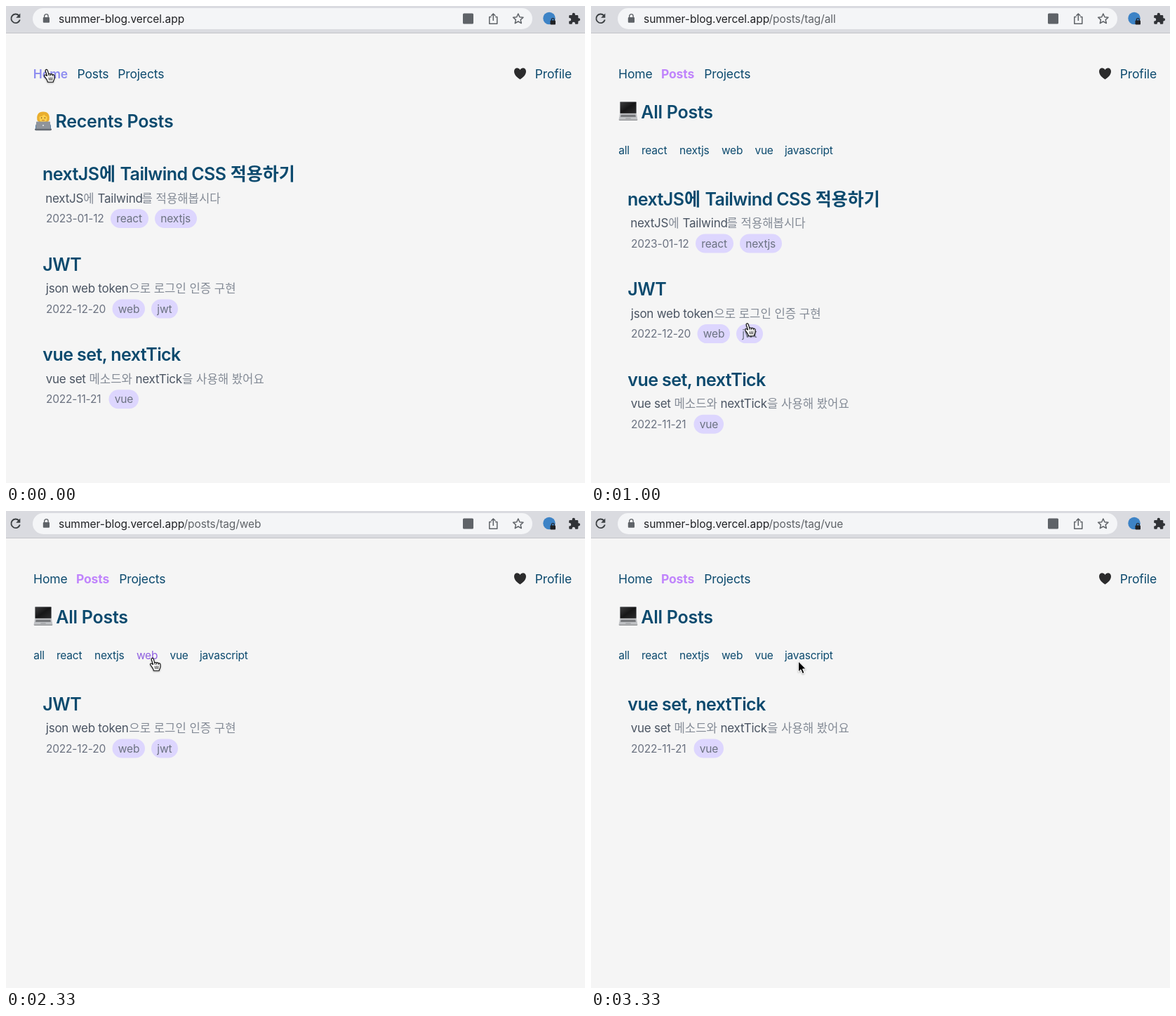
Animation, 825 px wide and 679 px high, one loop 3670 ms. Source, as an HTML page:

```html
<!DOCTYPE html>
<html lang="ko">
<head>
<meta charset="utf-8">
<title>Blog</title>
<style>
html, body { margin: 0; width: 100%; height: 100%; overflow: hidden; background: #f5f5f5; }
svg { display: block; }
text { font-family: Inter, "Noto Sans CJK KR", "Noto Sans CJK", sans-serif; font-optical-sizing: none; white-space: pre; }
.nav { font-size: 17.5px; letter-spacing: -.13px; fill: #0c4a6e; }
.head, .title { font-size: 25px; font-weight: 600; letter-spacing: -.27px; fill: #0c4a6e; }
.title { letter-spacing: -.57px; }
.desc { font-size: 17px; letter-spacing: -.25px; fill: #4b5563; }
.ko { font-family: "Noto Sans CJK KR", "Noto Sans CJK", sans-serif; letter-spacing: 0; }
.desc.ko { font-size: 16.7px; font-weight: 100; fill: #848b96; }
.small { font-size: 15.5px; letter-spacing: -.17px; fill: #6b7280; }
.tag { font-size: 15.5px; letter-spacing: -.22px; fill: #0c4a6e; }
.url { font-size: 15.5px; letter-spacing: 0; fill: #202124; }
.path { letter-spacing: -.1px; fill: #5f6368; }
</style>
</head>
<body>
<svg width="825" height="679" viewBox="0 0 825 679">
  <defs>
    <linearGradient id="screen" x1="0" y1="0" x2="1" y2="1">
      <stop offset="0" stop-color="#3c3c3e"/><stop offset=".5" stop-color="#161617"/><stop offset="1" stop-color="#2b2b2d"/>
    </linearGradient>
    <filter id="shade" x="-50%" y="-50%" width="200%" height="200%">
      <feDropShadow dx="0" dy="1" stdDeviation=".9" flood-opacity=".35"/>
    </filter>
    <g id="laptop">
      <rect x="41" y="136" width="24" height="17.5" rx="1.2" fill="#a3a5a8"/>
      <rect x="41.7" y="136.7" width="22.6" height="16" rx=".6" fill="url(#screen)"/>
      <path d="M41 153.5H65L66.3 161.5H39.7Z" fill="#bfc1c4"/>
      <path d="M42.7 154.7H63.3L63.9 158H42.1Z" fill="#77797c"/>
      <path d="M49.5 159H56.5L56.8 161H49.2Z" fill="#a8aaad"/>
      <path d="M39.7 161.5H66.3V162.3Q66 163 65 163H41Q40 163 39.7 162.3Z" fill="#8d8f92"/>
    </g>
    <g id="coder">
      <path d="M42 175V171Q42 167 47 166H59Q64 167 64 171V175Z" fill="#5a83a8"/>
      <path d="M44.5 163Q42.5 150.5 53 150.5Q63.5 150.5 61.5 163L59 165H47Z" fill="#e9ae2e"/>
      <path d="M47.5 157.5Q52 157 54.5 154.5Q56 157.500 58.5 157.500V160Q58 166 53 166Q48 166 47.5 160Z" fill="#ffcf4d"/>
      <circle cx="50.6" cy="159.3" r=".8" fill="#5a3b20"/>
      <circle cx="55.4" cy="159.3" r=".8" fill="#5a3b20"/>
      <path d="M51 162.4Q53 163.5 55 162.4" fill="none" stroke="#a8632a" stroke-width=".8"/>
      <rect x="43" y="164.5" width="20" height="11" rx="1" fill="#8f949b"/>
      <circle cx="53" cy="170" r="1.1" fill="#e4e6e9"/>
      <path d="M41 174.800H65V176Q64.5 177.3 63 177.3H43Q41.5 177.3 41 176Z" fill="#666b73"/>
    </g>
    <g id="hand" filter="url(#shade)" stroke="#111" stroke-linejoin="round" stroke-linecap="round">
      <path fill="#fff" stroke-width="1.15" d="M4.6 .9C3.3 1.1 2.9 2.2 3.4 3.5L5.6 9.9L4 8.9C2.5 8 1 9 1.8 10.5L5 15.1C5.7 16.3 6.3 16.9 6.4 18.7H14.2C14.3 16.6 16 15.6 16 12.5L15.9 9.8C15.8 8 13.9 7.6 13.4 8.8C13.2 7.2 11 6.8 10.5 8.2C10.1 6.8 8.2 6.6 7.8 7.7L6.2 2.3Q5.7 .8 4.6 .9Z"/>
      <path fill="none" stroke-width=".9" d="M8.3 12.5L8.7 16M10.6 12.3V16M12.8 12.3L12.5 16M7.8 7.7L8.5 10M10.5 8.2L10.8 10M13.4 8.8V10.2"/>
    </g>
    <path id="arrow" filter="url(#shade)" fill="#000" stroke="#fff" stroke-width="1" d="M.5 .5V15.5L3.9 12.3L6.4 18L9 16.9L6.6 11.4H11.3Z"/>
  </defs>

  <rect width="825" height="679" fill="#f5f5f5"/>
  <rect width="825" height="38" fill="#dadbe0"/>
  <rect y="38" width="825" height="1" fill="#c3c4c9"/>
  <rect x="38" y="3" width="712" height="30" rx="15" fill="#f4f5f7"/>

  <g fill="none" stroke="#3c4043" stroke-width="1.9">
    <path d="M18.3 13.5A6.3 6.3 0 1 0 19.8 19.5"/>
    <path d="M20.3 10.5V16.7H14.2Z" fill="#3c4043" stroke="none"/>
  </g>
  <rect x="52.8" y="16" width="9.2" height="7.8" rx="1" fill="#5f6368"/>
  <path d="M54.7 16V14.3A2.7 2.7 0 0 1 60.1 14.3V16" fill="none" stroke="#5f6368" stroke-width="1.4"/>
  <rect x="651" y="10.5" width="15" height="15" rx="1.5" fill="#5f6368"/>
  <g fill="none" stroke="#5f6368" stroke-width="1.5" stroke-linejoin="round">
    <path d="M691.5 15.5H688.8V25.2H699.8V15.5H697.1M694.3 21V11.5M691.3 14L694.3 11L697.3 14"/>
    <path d="M729.8 11L731.9 15.7L737 16.2L733.2 19.6L734.3 24.6L729.8 22L725.3 24.6L726.4 19.6L722.6 16.2L727.7 15.7Z"/>
  </g>
  <circle cx="774" cy="17.5" r="8.7" fill="#3d83c6"/>
  <rect x="775.5" y="20.5" width="7.5" height="6" rx="1" fill="#202124"/>
  <path d="M777.3 21V19.5A2 2 0 0 1 781.3 19.5V21" fill="none" stroke="#202124" stroke-width="1.2"/>
  <path fill="#303236" d="M803.5 13H806.7V11.8A2.1 2.1 0 0 1 810.9 11.8V13H814Q815.3 13 815.3 14.3V17.2H816A2.1 2.1 0 0 1 816 21.4H815.3V24.5Q815.3 25.8 814 25.8H811V25A2.2 2.2 0 0 0 806.6 25V25.8H803.5Q802.2 25.8 802.2 24.5V21.5H803A2.2 2.2 0 0 0 803 17.1H802.2V14.3Q802.2 13 803.5 13Z"/>

  <text class="url" x="75" y="23.5">summer-blog.vercel.app</text>
  <path fill="#2b2b2c" d="M732.5 104.5C729 102 724 98.5 724 93C724 87.3 730.5 86.8 732.5 91C734.5 86.8 741 87.3 741 93C741 98.5 736 102 732.5 104.5Z"/>
  <text class="nav" x="753.8" y="103">Profile</text>
  <g id="view"></g>
</svg>
<script>
const LOOP = 3670;
const view = document.getElementById("view");
const BLUE = "#0c4a6e", PURPLE = "#c084fc", MID = "#8d8cf0", HOVER = "#8f5fe0";

// runs and pills: [x, text(, width)]
const posts = [
  { title: [[52, "nextJS"], [133, "에"], [162.5, "Tailwind CSS"], [319.8, "적용하기"]],
    desc: [[56.3, "nextJS"], [110.3, "에"], [130.6, "Tailwind"], [193.5, "를 적용해봅시다"]],
    date: "2023-01-12", pills: [[149, "react", 54], [212, "nextjs", 60]] },
  { title: [[52.3, "JWT"]],
    desc: [[56.8, "json web token"], [175.3, "으로 로그인 인증 구현"]],
    date: "2022-12-20", pills: [[151.5, "web", 46.5], [207, "jwt", 38]] },
  { title: [[52.3, "vue set, nextTick"]],
    desc: [[56.7, "vue set"], [118.5, "메소드와"], [184.5, "nextTick"], [251, "을 사용해 봤어요"]],
    date: "2022-11-21", pills: [[146.5, "vue", 42.5]] }
];
const tags = [[39.2, "all"], [72, "react"], [126.1, "nextjs"], [185.9, "web"], [233.4, "vue"], [276, "javascript"]];

// [Home, Posts, Projects] as [x, colour, weight]
const navs = {
  homeIn: [[38.8, MID, 600], [101.5, BLUE, 400], [159.2, BLUE, 400]],
  homeOn: [[39, PURPLE, 700], [103, "#5c74cc", 450], [161.7, BLUE, 400]],
  postsIn: [[39, BLUE, 400], [99.9, MID, 600], [159.7, BLUE, 400]],
  postsOn: [[39, BLUE, 400], [99.9, PURPLE, 700], [161.2, BLUE, 400]]
};

// start, nav, tag in address (null = home), shown posts, pointer, x, y, hovered tag, its colour
const steps = [
  [0, "homeIn", null, [0, 1, 2], "hand", 53, 89.5],
  [330, "homeOn", null, [0, 1, 2], "hand", 113.5, 93.5],
  [670, "postsIn", "all", [0, 1, 2], "hand", 113.5, 93.5],
  [1000, "postsOn", "all", [0, 1, 2], "hand", 218, 451],
  [1330, "postsOn", "react", [0], "hand", 93.5, 198.5, "react", HOVER],
  [1670, "postsOn", "react", [0], "hand", 149, 202, "nextjs", HOVER],
  [2000, "postsOn", "nextjs", [0], "hand", 204, 209.5, "web", HOVER],
  [2330, "postsOn", "web", [1], "hand", 204, 208.5, "web", HOVER],
  [2670, "postsOn", "web", [1], "hand", 242, 208, "vue", HOVER],
  [3000, "postsOn", "vue", [2], "hand", 188, 251, "vue", "#4d53a6"],
  [3330, "postsOn", "vue", [2], "arrow", 295, 213.5]
];

const text = (cls, x, y, s, style = "") =>
  `<text class="${cls}${/[가-힣]/.test(s) ? " ko" : ""}" x="${x}" y="${y}" style="${style}">${s}</text>`;
const runs = (cls, list, y) => list.map(([x, s]) => text(cls, x, y, s)).join("");

function card(post, y) {
  const pills = post.pills.map(([x, s, w]) =>
    `<rect x="${x}" y="${y + 41}" width="${w}" height="27" rx="13.5" fill="#ddd6fe"/>` +
    text("small", x + 8.3, y + 60, s)).join("");
  return runs("title", post.title, y) + runs("desc", post.desc, y + 31.5) +
    text("small", 56.9, y + 60, post.date) + pills;
}

function draw([, nav, tag, shown, pointer, px, py, hot, tint]) {
  const home = tag === null;
  let out = navs[nav].map(([x, fill, weight], i) =>
    text("nav", x, 103, ["Home", "Posts", "Projects"][i], `fill:${fill};font-weight:${weight}`)).join("");
  if (home) {
    out += `<use href="#coder"/>` + text("head", 70.6, 173, "Recents Posts");
  } else {
    out += text("url path", 253.6, 23.5, "/posts/tag/" + tag) +
      `<use href="#laptop"/>` + text("head", 71.3, 159.5, "All Posts") +
      tags.map(([x, s]) => text("tag", x, 211, s, s === hot ? `fill:${tint}` : "")).join("");
  }
  const top = home ? 248 : 283.5;
  out += shown.map((p, i) => card(posts[p], top + i * 128.6)).join("");
  view.innerHTML = out + `<use href="#${pointer}" x="${px}" y="${py}"/>`;
}

const start = performance.now();
let current;
function tick() {
  const t = (performance.now() - start) % LOOP;
  const step = steps.findLast(s => s[0] <= t) || steps[0];
  if (step !== current) draw(current = step);
  requestAnimationFrame(tick);
}
tick();
</script>
</body>
</html>
```
